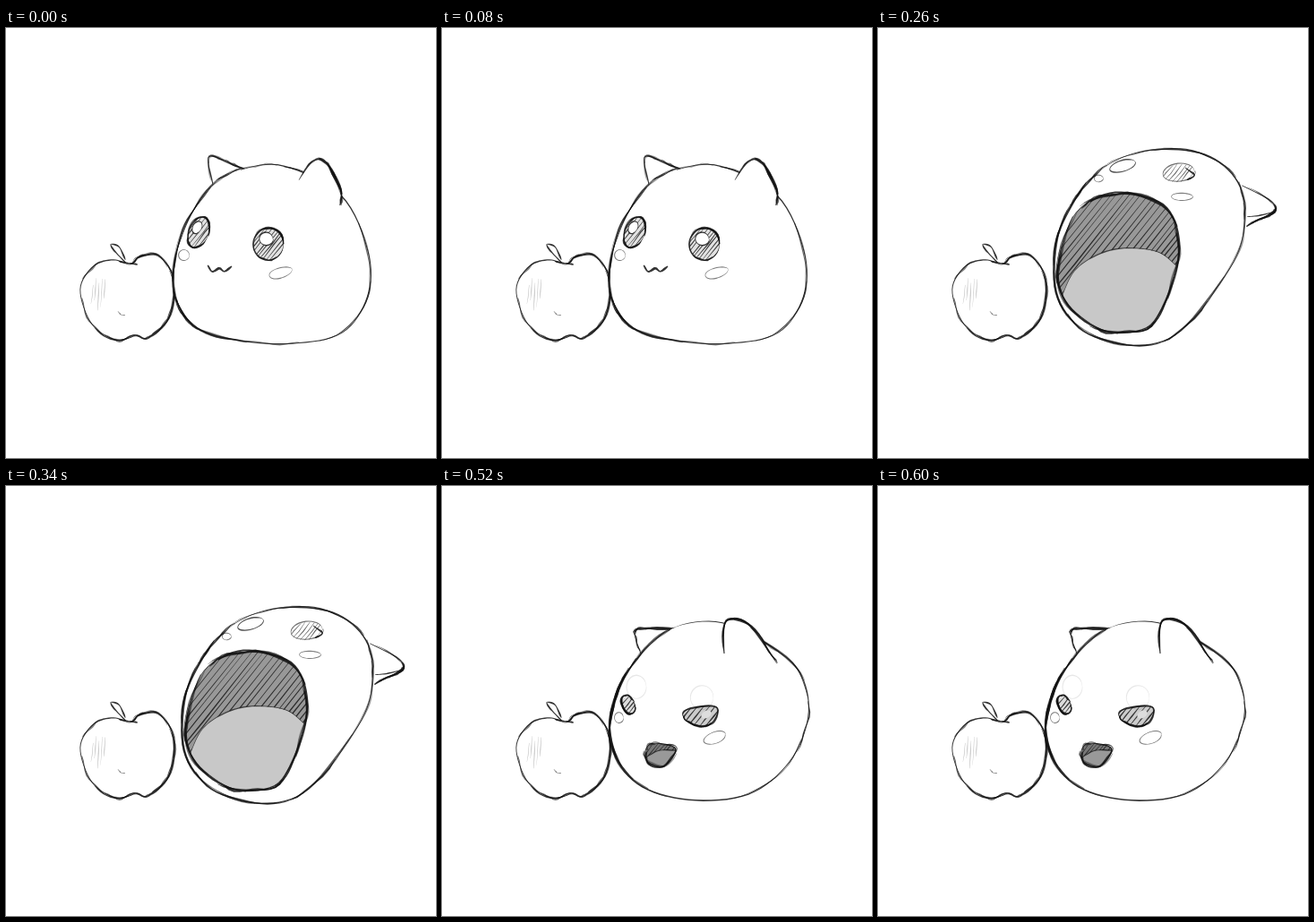
An HTML page for the animation above (650 ms loop, 480 by 480 pixels).

```html
<!DOCTYPE html>
<html lang="en">
<head>
<meta charset="utf-8">
<title>Blob cat and apple</title>
<style>
  html, body { margin: 0; width: 100%; height: 100%; overflow: hidden; background: #fff; }
  svg { display: block; width: 480px; height: 480px; }
</style>
</head>
<body>
<svg id="stage" viewBox="0 0 480 480"></svg>
<script>
const STEP = 130, TONGUE = '#c8c8c8';
let seed = 7, clips = 0;
const rnd = (a = 0, b = 1) => a + (b - a) * ((seed = (seed * 16807) % 2147483647) / 2147483647);
const path = c => 'M' + c.map(p => p[0].toFixed(1) + ' ' + p[1].toFixed(1)).join('L');
const fill = (c, color) => `<path d="${path(c)}Z" fill="${color}"/>`;

// Smooth (Catmull-Rom) samples through a few key points
function line(s, closed = false) {
  const p = s.split(' ').map(q => q.split(',').map(Number)), n = p.length, out = [];
  const at = i => p[closed ? (i + n) % n : Math.max(0, Math.min(n - 1, i))];
  const segs = closed ? n : n - 1;
  for (let k = 0; k < segs * 8; k++) {
    const i = k >> 3, t = (k & 7) / 8;
    const [a, b, c, d] = [at(i - 1), at(i), at(i + 1), at(i + 2)];
    out.push([0, 1].map(j => b[j] + t / 2 * (c[j] - a[j] +
      t * (2 * a[j] - 5 * b[j] + 4 * c[j] - d[j] + t * (3 * (b[j] - c[j]) + d[j] - a[j])))));
  }
  return [...out, at(segs)];
}
const loop = s => line(s, true);

function oval(x, y, rx, ry, deg = 0) {
  const r = deg * Math.PI / 180, c = Math.cos(r), s = Math.sin(r);
  return Array.from({ length: 33 }, (_, i) => {
    const a = i * Math.PI / 16, u = rx * Math.cos(a), v = ry * Math.sin(a);
    return [x + u * c - v * s, y + u * s + v * c];
  });
}

// One tapered pencil stroke with uneven pressure
function ink(c, w = 1.3, o = .85, wob = .3) {
  const n = c.length - 1, left = [], right = [], ph = rnd(0, 6), f = rnd(8, 16);
  c.forEach((p, i) => {
    const a = c[Math.max(0, i - 1)], b = c[Math.min(n, i + 1)], u = i / n;
    const dx = b[0] - a[0], dy = b[1] - a[1], len = Math.hypot(dx, dy) || 1;
    const h = w / 2 * Math.min(1, .4 + 5 * Math.min(u, 1 - u)) * (.9 + .25 * Math.sin(f * u + ph));
    const m = wob * Math.sin(f * u * .7 + ph * 2);
    left.push([p[0] - dy / len * (m + h), p[1] + dx / len * (m + h)]);
    right.unshift([p[0] - dy / len * (m - h), p[1] + dx / len * (m - h)]);
  });
  return `<path d="${path(left.concat(right))}Z" fill="#111" opacity="${o}"/>`;
}

// A contour gone over again with short loose strokes
function sketch(c, w = 1.4, loose = 1.1) {
  let out = ink(c, w, .85);
  for (let k = 0; k < c.length / 6; k++) {
    const i = Math.floor(rnd(0, c.length - 6));
    out += ink(c.slice(i, i + Math.floor(rnd(8, 24))), w * rnd(.6, 1.3), rnd(.4, .85), loose);
  }
  return out;
}

// Slanted strokes clipped to a shape
function hatch(shape, gap, w = 1.2, o = .8, lean = .8) {
  const xs = shape.map(p => p[0]), ys = shape.map(p => p[1]);
  const y0 = Math.min(...ys), y1 = Math.max(...ys), shift = (y1 - y0) * lean;
  let lines = '';
  for (let x = Math.min(...xs) - shift; x < Math.max(...xs); x += gap * rnd(.75, 1.25)) {
    lines += ink([[x, y1], [x + shift / 2 + rnd(-1, 1), (y0 + y1) / 2], [x + shift, y0]], w, o);
  }
  return clip(shape, lines);
}

function clip(shape, inner) {
  const id = 'c' + clips++;
  return `<clipPath id="${id}"><path d="${path(shape)}Z"/></clipPath><g clip-path="url(#${id})">${inner}</g>`;
}

const solid = (c, color = '#fff', w) => fill(c, color) + sketch(c, w);
const cheek = (...o) => ink(oval(...o), 1, .55, .6);
const shade = (shape, color, gap, w) => fill(shape, color) + hatch(shape, gap, w) + sketch(shape, 1.5, .8);

function shinyEye(x, y, rx, ry, deg) {
  const glint = oval(x - rx * .15, y - ry * .3, rx * .45, ry * .4, deg);
  return shade(oval(x, y, rx, ry, deg), '#e2e2e2', 4.4, 1.2) + fill(glint, '#fff') + ink(glint, 1.2);
}

// The tongue's top edge closes far below, the jaw trims it
function mouth(jaw, top, dark, light, gap, w = 1.6) {
  const a = top[0], b = top[top.length - 1];
  const tongue = [...top, [b[0], 400], [a[0], 400]];
  return fill(jaw, dark) + hatch(jaw, gap, 1.3) +
    clip(jaw, fill(tongue, light) + ink(top, 1.2, .7)) + sketch(jaw, w, 1.6);
}

function apple() {
  const skin = loop('138,264 120,259 98,266 83,292 96,331 124,349 143,343 158,346 181,324 188,284 170,254 148,256');
  let out = sketch(skin, 1.3) + ink(line('126,260 138,263 147,264'), 1.8) +
    ink(line('117,241 120,248 134,262'), 1.7) + ink(line('117,241 127,245 133,259'), 1.7) +
    ink(line('125,316 128,320 133,320'), 1, .5);
  for (let i = 0; i < 5; i++) {
    const x = 97 + i * 3.5, y = rnd(278, 288);
    out += ink([[x, y], [x - 1, y + 14], [x - 2, y + rnd(18, 32)]], .8, .28);
  }
  return out;
}

function calm() {
  return solid(line('231,176 226,145 244,148 270,160')) +
    solid(loop('262,158 310,154 374,187 404,250 403,300 375,340 320,352 262,349 213,335 190,304 188,260 203,214 232,174')) +
    solid(line('327,170 343,148 359,152 374,183 373,198'), '#fff', 1.6) +
    shinyEye(215, 228, 11, 18, 22) + shinyEye(293, 241, 17, 18, 0) +
    ink(line('225,265 230,272 238,268 244,272 252,266'), 2.5) +
    cheek(307, 273, 13, 6, -15) + cheek(199, 254, 6, 6);
}

function gape() {
  const jaw = loop('216,214 225,211 240,218 257,220 288,215 317,232 319,275 300,315 258,328 218,310 202,270');
  const left = oval(239, 186, 13, 6, 15), right = oval(301, 192, 14, 6);
  return solid(line('261,152 268,130 283,134 294,147')) +
    solid(loop('262,152 320,146 372,164 401,200 404,245 383,295 345,342 290,356 240,348 206,315 197,265 208,205 238,165')) +
    solid(line('347,152 360,128 378,154 394,188'), '#fff', 1.6) +
    mouth(jaw, line('203,290 222,273 262,261 322,263'), '#a8a8a8', TONGUE, 9.5) +
    ink(line('222,282 245,273 284,271'), .8, .5) +
    shade(left, '#777', 4, 1.3) + hatch(right, 5, 1, .6) + ink(right, 1.2, .7, .8) +
    ink(line('283,191 285,198 302,199 323,195'), 1.2, .75) +
    cheek(323, 210, 10, 5, 10) + cheek(223, 200, 6, 5, -30);
}

function lunge() {
  const jaw = loop('222,205 265,185 318,197 336,240 326,290 305,332 255,339 212,310 201,265');
  const eye = oval(336, 162, 18, 10, -8);
  return solid(line('406,176 436,191 442,205 411,221')) + ink(line('412,211 426,209 441,206')) +
    solid(loop('256,153 305,136 365,141 402,172 409,220 393,268 338,338 285,354 230,338 199,295 200,235 222,188')) +
    mouth(jaw, line('205,300 219,271 245,253 275,246 312,250 334,266'), '#989898', TONGUE, 7.2, 2) +
    hatch(eye, 4.5, 1, .65) + ink(eye, 1.1, .6, 1) + ink(line('343,156 353,164 345,170'), 1.8) +
    ink(oval(273, 154, 15, 6, -18), 1.3, .75) +
    cheek(340, 188, 12, 4) + cheek(247, 168, 5, 4);
}

function bite() {
  const lid = line('198,236 218,234 236,226 223,242 211,244 198,236');
  return solid(line('213,150 230,130 267,112 263,131')) +
    solid(loop('330,133 366,160 375,207 357,262 312,305 250,322 197,312 170,282 164,238 180,192 215,152 265,128')) +
    solid(line('270,132 295,112 327,103 331,138 308,178')) +
    fill(lid, '#333') + sketch(lid, 1.5) +
    ink(line('162,234 168,231 175,231'), 1.8) + cheek(161, 241, 6, 4) +
    ink(oval(239, 256, 14, 6, -20), 1.3, .75) +
    ink(line('173,289 184,295 194,289 201,280'), 2.6);
}

function chew() {
  const near = loop('269,257 278,248 307,247 302,264 285,268');
  return solid(line('223,189 215,163 230,159 274,160')) +
    solid(loop('255,160 313,153 374,184 402,213 409,258 388,308 342,344 275,350 218,332 190,292 191,245 213,198')) +
    solid(line('315,187 317,150 345,157 374,198'), '#fff', 1.6) +
    shade(near, '#ccc', 6, 1.5) + fill(oval(295, 255, 6, 4, -30), '#ddd') +
    shade(oval(208, 244, 7, 11, -25), '#ddd', 5, 1.2) +
    ink(oval(290, 236, 13, 13), 1.2, .1) + ink(oval(217, 224, 11, 13), 1.2, .1) +
    mouth(loop('227,296 236,287 261,293 248,313 230,308'), line('224,306 240,296 264,295'), '#777', '#999', 4.5) +
    cheek(304, 281, 13, 6, -18) + cheek(198, 259, 5, 6);
}

const stage = document.getElementById('stage');
stage.innerHTML = '<rect width="480" height="480" fill="#fff"/>' + apple() +
  [calm, gape, lunge, bite, chew].map(pose => `<g class="pose">${pose()}</g>`).join('');
const poses = [...stage.querySelectorAll('.pose')];

function draw(ms) {
  const now = Math.floor(ms / STEP) % poses.length;
  poses.forEach((g, i) => g.setAttribute('visibility', i === now ? 'visible' : 'hidden'));
}

let start = null;
function tick(t) {
  if (start === null) start = t;
  draw(t - start);
  requestAnimationFrame(tick);
}
draw(0);
requestAnimationFrame(tick);
</script>
</body>
</html>
```
